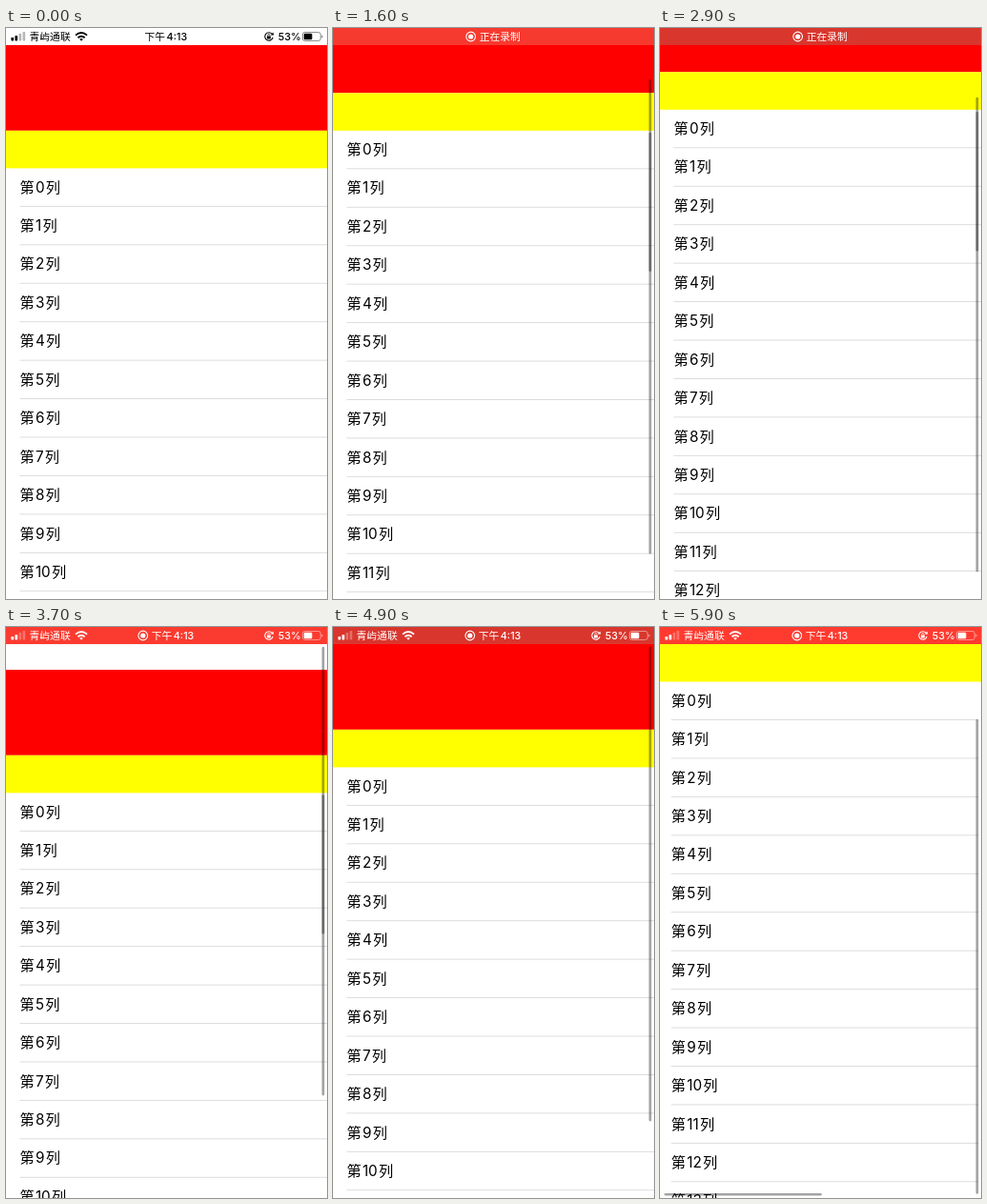
Animation of 337x600 px, one loop 6000 ms. Source, as an HTML page:

```html
<!DOCTYPE html>
<html lang="zh-CN">
<head>
<meta charset="utf-8">
<title>列表滚动</title>
<style>
  html, body { margin: 0; width: 100%; height: 100%; overflow: hidden; background: #fff; }
  /* Laid out in 375-point-wide units, scaled evenly to the stage. */
  #screen {
    position: absolute; width: 375px; height: 667.7px; overflow: hidden; background: #fff;
    transform: scale(.898667); transform-origin: 0 0;
    font: 17px Inter, "Noto Sans CJK SC", "Noto Sans CJK", sans-serif; color: #000;
  }
  #screen div, #screen svg { position: absolute; }
  #header { top: 20px; width: 375px; height: 100px; background: #f00; }
  #tabs { top: 120px; width: 375px; height: 44px; background: #ff0; }
  #pager { top: 164px; width: 375px; height: 760px; overflow: hidden; }
  .list { top: 0; width: 375px; }
  .row { left: 16px; right: 0; height: 45px; line-height: 45px; white-space: nowrap; }
  .row::after {
    content: ""; position: absolute; left: 0; right: 0; bottom: 0; height: 1px; background: #d9d9dc;
  }
  .num { margin: 0 1.4px; }
  .thumb { background: rgba(0, 0, 0, .36); border-radius: 2px; }
  .vertical { right: 3px; width: 3px; }
  #across { bottom: 3px; height: 3px; width: 184px; }
  .status {
    top: 0; left: 0; width: 375px; height: 20px; line-height: 20px;
    font-size: 12px; font-weight: 500; white-space: nowrap;
  }
  .status .num { margin: 0 0 0 1.6px; }
  .status svg { left: 0; top: 0; }
</style>
</head>
<body>
<div id="screen">
  <div id="header"></div>
  <div id="pager"></div>
  <div id="tabs"></div>
  <div id="inner" class="thumb vertical"></div>
  <div id="outer" class="thumb vertical"></div>
  <div id="across" class="thumb"></div>
</div>
<script>
const LOOP = 6000, STEP = 100, ROW = 45;
const screen$ = document.getElementById('screen');
const el = id => document.getElementById(id);

// [time, value] keys, joined by straight lines.
const DRAG = [
  [1200, 0], [1300, 5], [1600, 44], [1900, 97], [2100, 133], [2300, 150], [2500, 130],
  [2700, 98], [2900, 68.5], [3100, 68.5], [3300, 38], [3500, -4], [3700, -30], [3800, -34],
  [3900, -25], [4000, -13], [4100, -6], [4200, -2], [4300, 0],
  [4900, 0], [5000, 34], [5100, 80], [5200, 98], [5300, 100]
];
const SWIPE = [[5400, 0], [5500, 8], [5600, 24], [5700, 28], [5800, 12], [5900, 3]];
const OUTER_ALPHA = [[1200, 0], [1300, 1], [3900, 1], [4300, 0], [4400, 0], [4600, 1]];
const INNER_ALPHA = [[1200, 0], [1300, 1], [3900, 1], [4300, 0]];
const ACROSS_ALPHA = [[5400, 0], [5500, 1]];
const PLAIN = [[0, 1], [400, 0]];
const RECORDING = [[0, 0], [400, 1], [3200, 1], [3400, 0]];
const LIVE = [[3200, 0], [3400, 1]];

function at(keys, t) {
  const i = keys.findIndex(key => key[0] > t);
  if (i === 0) return keys[0][1];
  if (i < 0) return keys[keys.length - 1][1];
  const [t0, v0] = keys[i - 1], [t1, v1] = keys[i];
  return v0 + (v1 - v0) * (t - t0) / (t1 - t0);
}

function add(parent, className, html = '', style = '') {
  const node = document.createElement('div');
  node.className = className;
  node.innerHTML = html;
  node.style.cssText = style;
  parent.append(node);
  return node;
}

function makeList() {
  const list = add(el('pager'), 'list');
  for (let i = 0; i < 20; i++) {
    add(list, 'row', `第<span class="num">${i}</span>列`, `top:${i * ROW}px`);
  }
  return list;
}

const SIGNAL = [4, 6, 8.5, 10.5].map((h, i) =>
  `<rect x="${6 + i * 4.5}" y="${15 - h}" width="3" height="${h}" rx=".8" opacity="${i < 2 ? 1 : .28}"/>`).join('');
const WIFI = `<g fill="none" stroke="currentColor" stroke-width="2.1">
  <path d="M81.3 8.5Q88 2.8 94.7 8.5"/><path d="M84 11.3Q88 8 92 11.3"/></g>
  <path d="M86 13Q88 11.4 90 13L88 15.2Z"/>`;
const LOCK = `<path d="M310.8 7.1A4.7 4.7 0 1 0 311.7 11" fill="none" stroke="currentColor" stroke-width="1.2"/>
  <path d="M309.2 8.4L313 8.3L312 5Z"/>
  <rect x="304.8" y="9.4" width="4.4" height="3.3" rx=".5"/>
  <path d="M305.7 9.5V8.6a1.3 1.3 0 0 1 2.6 0V9.5" fill="none" stroke="currentColor" stroke-width=".8"/>`;
const BATTERY = `<rect x="346.5" y="5" width="21" height="10" rx="2.6" fill="none" stroke="currentColor" opacity=".5"/>
  <rect x="348" y="6.5" width="9.6" height="7" rx="1.3"/>
  <path d="M368.7 8.3q1.5 .5 1.5 1.7t-1.5 1.7z" opacity=".5"/>`;
const dot = x => `<circle cx="${x}" cy="10" r="5.4" fill="none" stroke="currentColor" stroke-width="1.2"/>
  <circle cx="${x}" cy="10" r="2.9"/>`;

function makeStatus(color, icons, label, labelX, full) {
  const bar = add(screen$, 'status',
    `<svg width="375" height="20" fill="currentColor">${full ? SIGNAL + WIFI + LOCK + BATTERY : ''}${icons}</svg>`,
    `color:${color}`);
  const text = (html, x) => add(bar, '', html, `left:${x}px`);
  text(label, labelX);
  if (full) {
    text('青屿通联', 27.3);
    text('53%', 318);
  }
  return bar;
}

const lists = [makeList(), makeList()];
const backdrop = add(screen$, 'status');
const CLOCK = '下午<span class="num">4:13</span>';
const bars = [
  [makeStatus('#000', '', CLOCK, 162, true), PLAIN],
  [makeStatus('#fff', dot(161), '正在录制', 171, false), RECORDING],
  [makeStatus('#fff', dot(160), CLOCK, 170, true), LIVE]
];

function thumb(node, top, height, alpha) {
  node.style.top = top + 'px';
  node.style.height = height + 'px';
  node.style.opacity = alpha;
}

function draw(t) {
  const drag = at(DRAG, t);
  const scroll = Math.min(drag, 100);
  const listScroll = Math.max(drag - 100, 0);
  const swipe = at(SWIPE, t);

  for (const id of ['header', 'tabs', 'pager']) {
    el(id).style.transform = `translateY(${-scroll}px)`;
  }
  lists.forEach((list, page) => {
    list.style.transform = `translate(${page * 375 - swipe}px, ${-listScroll}px)`;
  });

  thumb(el('outer'), 23 + .85 * Math.max(scroll, 0), 555 + Math.min(scroll, 0), at(OUTER_ALPHA, t));
  thumb(el('inner'), 166 - scroll + .288 * listScroll, 163, at(INNER_ALPHA, t));
  el('across').style.left = 3 + swipe / 2 + 'px';
  el('across').style.opacity = at(ACROSS_ALPHA, t);

  // The red bar breathes once every two seconds.
  const glow = (1 + Math.cos((t - 1900) / 1000 * Math.PI)) / 2;
  const plain = at(PLAIN, t);
  const tint = [217 + 38 * glow, 54 + 5 * glow, 45 + 3 * glow].map(c => Math.round(c + (255 - c) * plain));
  backdrop.style.background = `rgb(${tint})`;
  for (const [bar, keys] of bars) bar.style.opacity = at(keys, t);
}

const start = performance.now();
function tick() {
  const t = Math.max(performance.now() - start, 0) % LOOP;
  draw(Math.floor(t / STEP) * STEP);
  requestAnimationFrame(tick);
}
tick();
</script>
</body>
</html>
```
